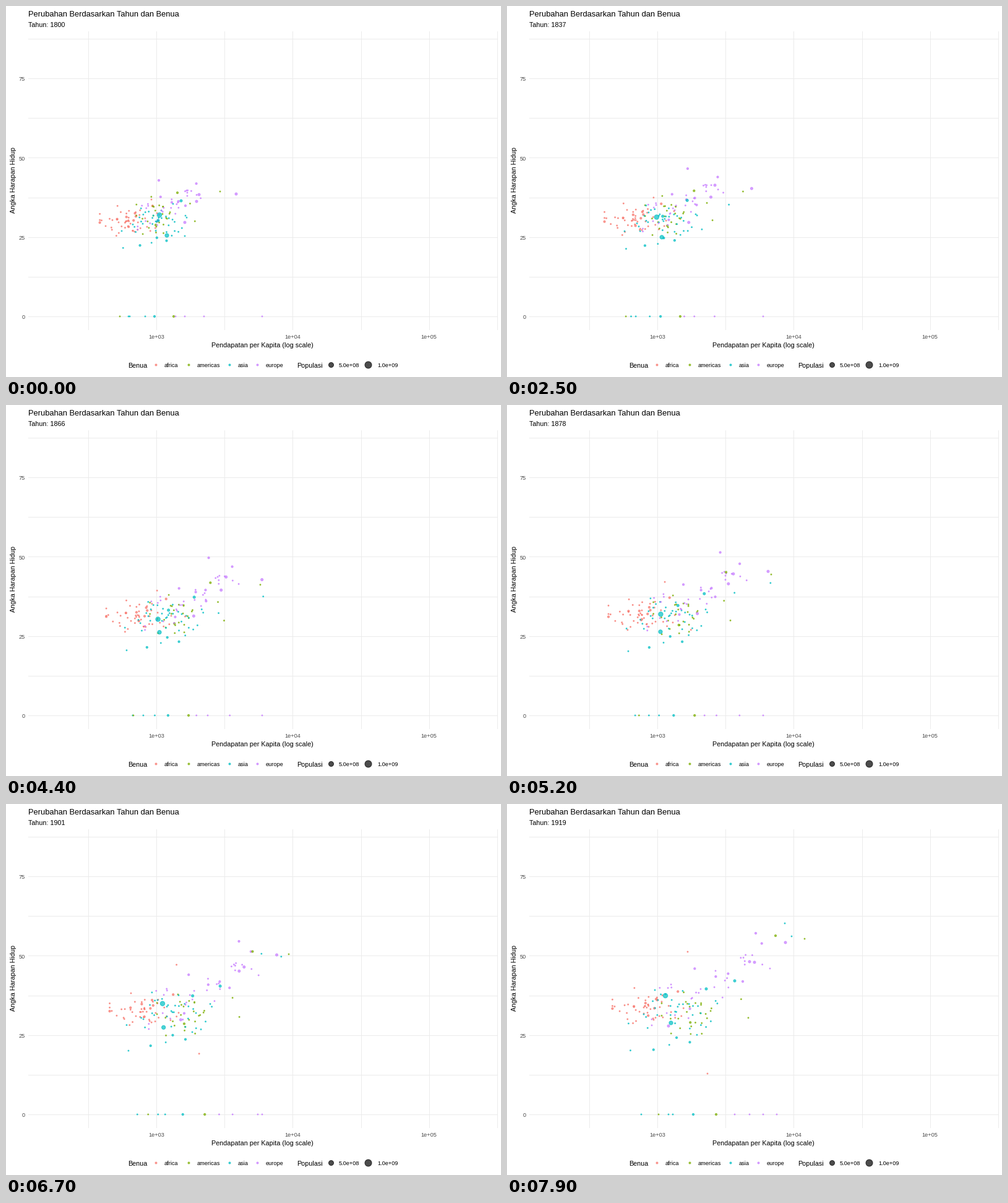
A matplotlib script for the animation above (8 s loop, 800 by 600 pixels).

```python
import numpy as np
import matplotlib.pyplot as plt
from matplotlib.animation import FuncAnimation
from matplotlib.colors import to_rgba

plt.rcParams["font.family"] = "Liberation Sans"

W, H, DPI = 800, 600, 100
PX = 72 / DPI
FRAMES, INTERVAL = 80, 100
YEARS_PER_FRAME = 1.51
SMALL, MEDIUM, LARGE = 2.9, 4.2, 5

# Panel geometry: half a decade and 12.5 years per grid step
LEFT, RIGHT, TOP, BOTTOM = 36, 795, 41, 524
X0, DX = 133.5, 110.15
Y0, DY = 502.5, 64.2

AFRICA, AMERICAS, ASIA, EUROPE = "#F8766D", "#7CAE00", "#00BFC4", "#C77CFF"

now = np.arange(FRAMES)
p = now / (FRAMES - 1)
late = p ** 1.75
rng = np.random.default_rng(18)
paths, sizes, colors = [], [], []


def add(color, size, x, y):
    paths.append(np.column_stack([x, np.broadcast_to(y, FRAMES)]))
    sizes.append(size)
    colors.append(color)


def mix(pair, t):
    return pair[0] + (pair[1] - pair[0]) * t


def crowd(color, n, mx, sx, my, sy, slope=0.0):
    """Scatter n countries around a centre drifting from start to end."""
    for _ in range(n):
        u = np.clip(rng.normal(), -1.6, 1.9)
        v = np.clip(rng.normal(), -1.9, 1.9)
        phase, speed = rng.uniform(0, 6.3), rng.uniform(0.08, 0.2)
        size = MEDIUM if rng.random() < 0.12 else SMALL
        dx = u * mix(sx, p)
        wobble = 3 * p * np.sin(phase + speed * now)
        add(color, size, mix(mx, p) + dx,
            mix(my, late) + slope * dx + v * mix(sy, late) + wobble)


def baseline(color, size, start, end):
    """A country without a life expectancy slides along zero."""
    add(color, size, mix((start, end), late), Y0 - 0.5)


def journey(color, size, *stops):
    """Move through stops that are evenly spaced in time."""
    xs, ys = zip(*stops)
    t = np.linspace(0, 1, len(stops))
    add(color, size, np.interp(p, t, xs), np.interp(p, t, ys))


crowd(AFRICA, 49, (198, 228), (29, 36), (348, 329), (13, 15))
crowd(AMERICAS, 27, (254, 314), (27, 40), (337, 336), (16, 18), -0.1)
crowd(ASIA, 38, (235, 262), (30, 41), (354, 342), (16, 26), -0.15)
crowd(EUROPE, 33, (264, 330), (32, 60), (324, 292), (12, 20), -0.45)

baseline(ASIA, SMALL, 198, 217)
baseline(ASIA, SMALL, 200, 261)
baseline(ASIA, SMALL, 225, 268)
baseline(ASIA, MEDIUM, 240, 301)
baseline(AMERICAS, SMALL, 184, 245)
baseline(AMERICAS, MEDIUM, 271, 338)
baseline(EUROPE, SMALL, 274, 368)
baseline(EUROPE, SMALL, 289, 392)
baseline(EUROPE, SMALL, 320, 436)
baseline(EUROPE, SMALL, 414, 414)

# Countries that stand out from the crowd
journey(AFRICA, SMALL, (235, 313), (238, 308), (292, 239))
journey(AFRICA, SMALL, (244, 335), (285, 330), (324, 436))
journey(AMERICAS, SMALL, (346, 300), (402, 300), (481, 218))
journey(AMERICAS, MEDIUM, (277, 302), (317, 297), (434, 213))
journey(ASIA, SMALL, (270, 320), (410, 322), (460, 214))
journey(ASIA, SMALL, (289, 372), (330, 355), (449, 193))
journey(ASIA, LARGE, (283, 315), (296, 314), (368, 286))
journey(ASIA, LARGE, (246, 347), (255, 336), (322, 299))
journey(EUROPE, MEDIUM, (247, 282), (318, 252), (402, 209))
journey(EUROPE, MEDIUM, (290, 323), (316, 321), (381, 287))
journey(EUROPE, LARGE, (312, 305), (350, 281), (400, 256))
journey(EUROPE, LARGE, (308, 316), (342, 305), (392, 255))
journey(EUROPE, LARGE, (289, 350), (294, 350), (308, 337), (261, 359))
journey(EUROPE, LARGE, (372, 304), (409, 290), (450, 224))
journey(ASIA, 8.4, (248, 338), (241, 338), (244, 351), (251, 331), (256, 310))
journey(ASIA, 7.2, (260, 371), (251, 376), (248, 368), (248, 366), (265, 354))

paths = np.array(paths)

fig = plt.figure(figsize=(W / DPI, H / DPI), dpi=DPI, facecolor="white")
ax = fig.add_axes([0, 0, 1, 1])
ax.set(xlim=(0, W), ylim=(H, 0))
ax.axis("off")


def label(x, y, text, size, color="black", **kw):
    kw = {"ha": "left", "va": "baseline", **kw}
    return ax.text(x, y, text, fontsize=size * PX, color=color, **kw)


def dots(xy, diameters, tints):
    """Translucent discs whose outline overlaps the fill."""
    xy = np.asarray(xy, float)
    d = (np.asarray(diameters) - 1) * PX
    rgba = [to_rgba(c, 0.7) for c in tints]
    return ax.scatter(xy[:, 0], xy[:, 1], s=d ** 2, facecolors=rgba,
                      edgecolors=rgba, linewidths=PX, zorder=3)


# Grid lines fill exactly one pixel
grid = dict(colors="#EBEBEB", linewidth=PX, snap=False, zorder=1)
ax.vlines(np.floor(X0 + DX * np.arange(7)) + 0.5, TOP, BOTTOM, **grid)
ax.hlines(np.round(Y0 - 0.3 - DY * np.arange(8)) + 0.5, LEFT, RIGHT, **grid)

# Titles and axes
label(36, 17, "Perubahan Berdasarkan Tahun dan Benua", 12.9)
subtitle = label(36, 34, "", 10.8)
label(414.5, 552, "Pendapatan per Kapita (log scale)", 10.7, ha="center")
label(12, 281.5, "Angka Harapan Hidup", 10.7, rotation=90,
      ha="center", va="center")
for k in range(3):
    label(X0 + DX * (2 * k + 1) - 0.5, 538, f"1e+0{k + 3}", 9.1,
          "#4D4D4D", ha="center")
for k in range(4):
    label(31, Y0 - 2 * DY * k + 4, str(25 * k), 9.1, "#4D4D4D", ha="right")

# Legends
label(197, 585, "Benua", 10.8)
for dot_x, text_x, name, color in (
        (242, 256, "africa", AFRICA), (295, 309, "americas", AMERICAS),
        (361, 375, "asia", ASIA), (406, 420, "europe", EUROPE)):
    dots([(dot_x, 580)], [4], [color])
    label(text_x, 584, name, 9.2)
label(470, 585, "Populasi", 10.8)
for dot_x, text_x, size, name in ((524.5, 538, 9, "5.0e+08"),
                                  (585, 600, 12, "1.0e+09")):
    dots([(dot_x, 580)], [size], ["black"])
    label(text_x, 584, name, 9.2)

cloud = dots(paths[:, 0], sizes, colors)


def draw(i):
    cloud.set_offsets(paths[:, i])
    subtitle.set_text(f"Tahun: {1800 + int(i * YEARS_PER_FRAME)}")
    return cloud, subtitle


anim = FuncAnimation(fig, draw, frames=FRAMES, interval=INTERVAL,
                     repeat=True, repeat_delay=0)
plt.show()
```
